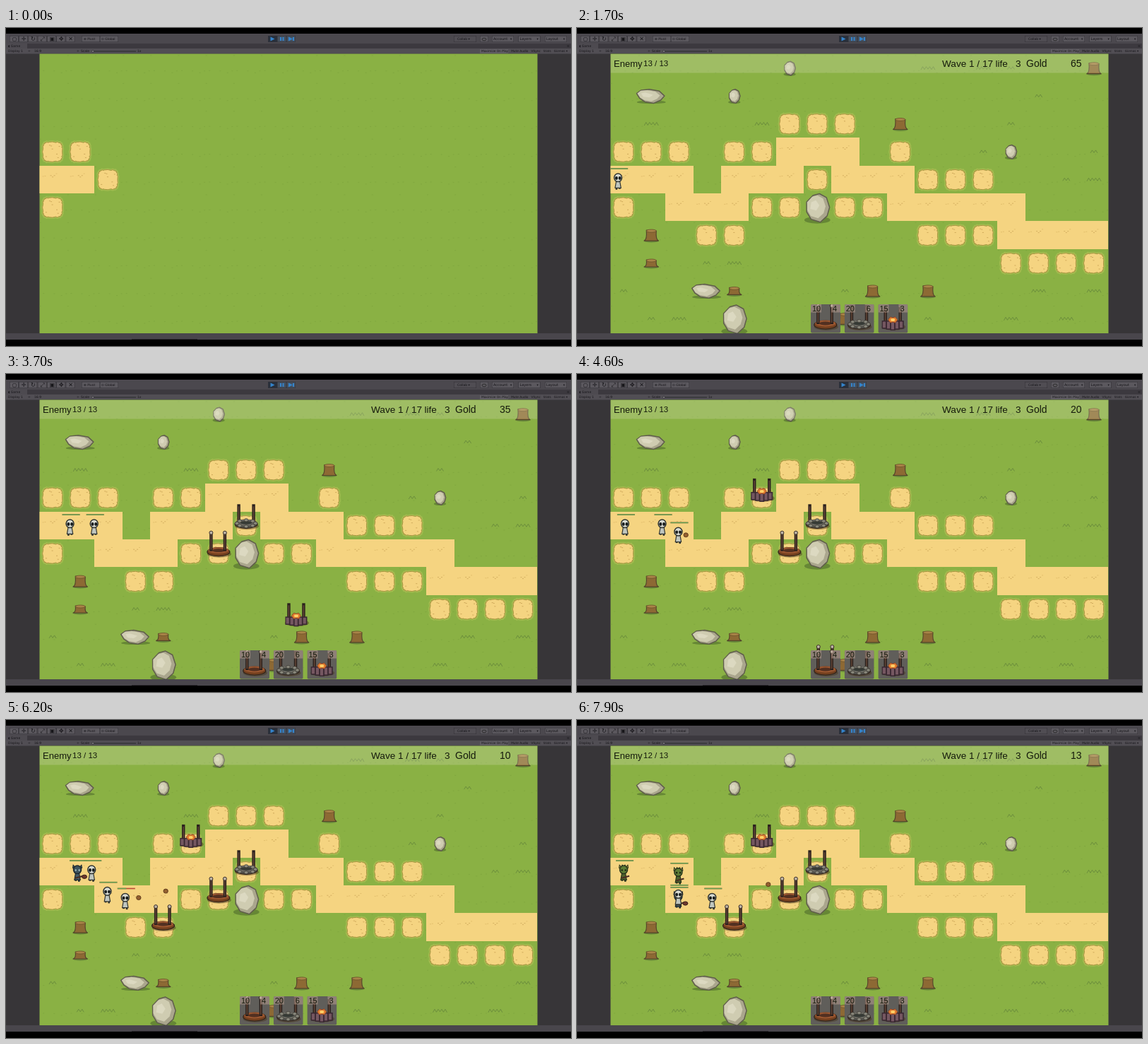
Recreate the animation shown at these times as an HTML page with a canvas. Size 800 px wide and 450 px high, loop 8 s.

```html
<!DOCTYPE html>
<html lang="en">
<head>
<meta charset="utf-8">
<title>Tower defense</title>
<style>
html, body { margin: 0; width: 100%; height: 100%; overflow: hidden; background: #000; }
canvas { display: block; width: 800px; height: 450px; }
</style>
</head>
<body>
<canvas id="stage" width="800" height="450"></canvas>
<script>
const c = document.getElementById('stage').getContext('2d');
const LOOP = 8000, STEP = 100, TAU = Math.PI * 2;
const X0 = 47, Y0 = 37, CW = 39.17, CH = 39.4;

// # road, o pad, w tuft, t stump, s low stump, r stone, f flat rock, R boulder
const level = [
  '......r....w.ww..t',
  '.f..r..........w..',
  '.w...wooo.t...w...',
  'ooo.oo###.o..wr..w',
  '###.###o###ooo..ww',
  'o.###ooRoo#####...',
  '.t.oo......ooo####',
  '.s.ww.........oooo',
  'w..fs...wt.t...w.w',
  '.ww.R...t..w..w.w.'
];
const tile = (col, row) => level[row]?.[col];
const mid = (col, row) => [X0 + (col + .5) * CW, Y0 + (row + .5) * CH];
const cells = level.flatMap((line, row) => [...line].map((kind, col) => ({ kind, col, row })));

// Follow the road from the left edge, preferring to go right
const path = [{ col: 0, row: 4 }];
for (let at = path[0], prev; at; at = prev && path.at(-1) !== prev ? path.at(-1) : null) {
  prev = at;
  const next = [[1, 0], [0, 1], [0, -1]]
    .map(([dx, dy]) => ({ col: at.col + dx, row: at.row + dy }))
    .find(p => tile(p.col, p.row) === '#' && !path.some(q => q.col === p.col && q.row === p.row));
  if (next) path.push(next);
}
const pads = cells.filter(p => p.kind === 'o');
for (const p of pads)
  p.from = path.findIndex(q => Math.abs(p.col - q.col) + Math.abs(p.row - q.row) === 1);

const shop = [
  { kind: 'wood', price: 10, power: 4 },
  { kind: 'stone', price: 20, power: 6 },
  { kind: 'fire', price: 15, power: 3 }
];
const builds = [
  { item: 0, col: 6, row: 5, grab: 1900, drop: 2400 },
  { item: 1, col: 7, row: 4, grab: 2480, drop: 3300 },
  { item: 2, col: 5, row: 3, grab: 3600, drop: 4300 },
  { item: 0, col: 4, row: 6, grab: 4600, drop: 5300 }
];
const speed = { ghost: 33.3, cat: 47, goblin: 60 };
const foes = [
  { kind: 'ghost', born: 1380 },
  { kind: 'ghost', born: 2405 },
  { kind: 'cat', born: 5060 },
  { kind: 'ghost', born: 3985 },
  { kind: 'goblin', born: 6240 },
  { kind: 'goblin', born: 7590 }
];
const FLIGHT = 800, DAMAGE = .25, BOUNTY = 3;
const shots = [3855, 4690, 5516, 5750, 7685];
// The leading foe takes shots until it falls, then the next one does
const target = i => foes[Math.floor(i * DAMAGE)];
const health = (foe, t) =>
  1 - DAMAGE * shots.filter((fired, i) => target(i) === foe && t >= fired + FLIGHT).length;

const mix = (a, b, p) => a + (b - a) * p;
function seeded(seed) {
  return () => (seed = (seed * 16807 + 11) % 2147483647) / 2147483647;
}

function paint(fill, line, lw = 1) {
  c.lineJoin = 'round';
  if (fill) { c.fillStyle = fill; c.fill(); }
  if (line) { c.strokeStyle = line; c.lineWidth = lw; c.stroke(); }
}
function box(x, y, w, h, fill) { c.fillStyle = fill; c.fillRect(x, y, w, h); }
function oval(x, y, rx, ry, fill, line, lw) {
  c.beginPath(); c.ellipse(x, y, rx, ry, 0, 0, TAU); paint(fill, line, lw);
}
function poly(pts, fill, line, lw) {
  c.beginPath(); pts.forEach(p => c.lineTo(...p)); c.closePath(); paint(fill, line, lw);
}
// Closed outline of n points: shape(angle, index) gives each point
function ring(n, shape, ...style) {
  poly(Array.from({ length: n }, (_, i) => shape(i * TAU / n, i)), ...style);
}
function at(x, y, draw) { c.save(); c.translate(x, y); draw(); c.restore(); }
function text(s, x, y, size, fill = '#151a0c', face = '"Liberation Sans", Arial, sans-serif') {
  c.font = size + 'px ' + face; c.fillStyle = fill; c.fillText(s, x, y);
}
function fillCell(col, row, fill) {
  const x = Math.round(X0 + col * CW), y = Math.round(Y0 + row * CH);
  box(x, y, Math.round(X0 + (col + 1) * CW) - x, Math.round(Y0 + (row + 1) * CH) - y, fill);
}
function specks(n, seed, spread, fill) {
  const rnd = seeded(seed);
  for (let i = 0; i < n; i++) box((rnd() - .5) * spread, (rnd() - .5) * spread, 2, 1, fill);
}

function road({ col, row }) {
  fillCell(col, row, '#f5d481');
  at(...mid(col, row), () => {
    for (let i = 0; i < 3; i++) box(-4 + i * 2.5, -6 + i % 2 * 2, 2, 1, '#d3ae60');
    specks(3, 71, 30, '#e2bf6d');
  });
}

function pad({ col, row }) {
  const [x, y] = mid(col, row);
  at(x - .7, y + .3, () => {
    const edge = (a, i) => [Math.cos(a), Math.sin(a)]
      .map(v => Math.sign(v) * Math.abs(v) ** .48 * (13.7 + .6 * Math.sin(i * 2.3)));
    ring(56, edge, null, '#a3bc50', 4);
    ring(56, edge, '#f5d481', '#a58f3d', .9);
    specks(7, 29, 20, '#cfa95b');
  });
}

function rock(w, h, flat) {
  oval(0, h * .44, w * .54, h * .12, '#668735');
  const edge = (grow, shift) => (a, i) => {
    const y = Math.sin(a), r = grow * (.49 + .035 * Math.sin(i * 4.1));
    const lean = flat ? -.16 * Math.max(0, -y) : .02;
    const slim = flat ? 1 : 1 + .16 * y;
    return [w * (Math.cos(a) * r * slim + lean + shift), h * (y * r + shift * .5)];
  };
  ring(9, edge(1, 0), '#aaa68d', '#5f5d4b', 1.5);
  ring(9, edge(.8, -.07), '#cfccb1');
  ring(5, edge(.4, -.13), '#dcd9c1');
}

function stump(h) {
  oval(0, h / 2 - 1, 11, 2.5, '#68863a');
  c.beginPath();
  c.moveTo(-7, -h / 2 + 2);
  c.quadraticCurveTo(-6, h / 3, -10, h / 2 - 1);
  c.lineTo(10, h / 2 - 1);
  c.quadraticCurveTo(6, h / 3, 7, -h / 2 + 3);
  c.closePath();
  paint('#8d6934', '#55452a', 1.2);
  oval(0, -h / 2 + 3, 7, 2, '#a98348', '#6b5129', .8);
}

function tuft(wide) {
  const n = wide ? 4 : 2;
  c.beginPath();
  for (let i = -n; i <= n; i++) c.lineTo(i * 2.5, i % 2 ? -2 : 1.5 + Math.abs(i) / 4);
  paint(null, '#64853a', .8);
}

const scenery = {
  w: p => tuft((p.col + p.row) % 2),
  t: () => stump(18),
  s: () => stump(13),
  r: () => rock(16, 20),
  f: () => rock(38, 20, true),
  R: () => rock(34, 41)
};
const decor = Object.keys(scenery).flatMap(kind => cells.filter(p => p.kind === kind));

function tower(kind, x, y) {
  const wood = kind === 'wood', fire = kind === 'fire';
  const pole = px => {
    const top = fire ? -24 : -27;
    box(px - 2.2, top, 4.4, 27, '#2b211d');
    box(px - .8, top + 3, 1.5, 22, '#634637');
    if (wood) oval(px, top + 1, 2.5, 2.5, '#beb4a5', '#3a2d26');
  };
  at(x - .7, y - 3, () => {
    oval(1, 4, 17, 5, 'rgba(70,50,25,.45)');
    if (!wood) { pole(-10.5); pole(10.5); }
    if (fire) {
      for (let dx = -12; dx <= 12; dx += 6) {
        const low = 9 - Math.abs(dx) / 5;
        box(dx - 3.5, -5, 7, low + 5, '#382731');
        box(dx - 2.3, -3.5, 4.2, low + 2, '#755761');
      }
      ring(12, (a, i) => [Math.cos(a) * 6.5, -6 + Math.sin(a) * (i % 2 ? 3 : 4.8)], '#df7a2f', '#833d22', .8);
      oval(0, -6, 3, 2, '#ffd068');
    } else {
      oval(0, 1, 16, 6, wood ? '#74401f' : '#4f4e49', '#30231a', 1.2);
      oval(0, -1, 14.5, 4.4, wood ? '#9a5630' : '#6b6a63');
      oval(0, -1, 8.5, 2.4, wood ? '#523021' : '#363a35');
    }
    if (wood) { pole(-10.5); pole(9); }
    if (kind === 'stone')
      for (let a = 0; a < TAU; a += TAU / 8)
        oval(13 * Math.cos(a), 4.5 * Math.sin(a), 2.8, 2.1, '#8a897d', '#3f3d37', .8);
  });
}

function locate(foe, t) {
  const steps = (t - foe.born) / 1000 * speed[foe.kind] / CW - .45;
  const i = Math.max(0, Math.floor(steps)), p = steps - i;
  const a = mid(path[i].col, path[i].row), b = mid(path[i + 1].col, path[i + 1].row);
  return [mix(a[0], b[0], p) - 1.5, mix(a[1], b[1], p) + 3.5];
}

const looks = {
  ghost: { skin: '#d7dad2', robe: '#c0c6bf', line: '#303430', eye: '#181d1d' },
  cat: { skin: '#3d535d', robe: '#465c65', line: '#1c272c', eye: '#a8c3c4', ears: 2 },
  goblin: { skin: '#5d7d35', robe: '#4d612c', line: '#28341c', eye: '#171d12', ears: 4 }
};

function drawFoe(foe, t) {
  const [x, y] = locate(foe, t), { skin, robe, line, eye, ears = 0 } = looks[foe.kind];
  const step = Math.floor(t / 200) % 2;
  at(x, y, () => {
    box(-3.5, 7, 2.6, 4 - step, line);
    box(1, 7, 2.6, 3 + step, line);
    poly([[-2.5, -1], [2.5, -1], [4.2, 8.5], [-4.2, 8.5]], robe, line, 1.2);
    for (let i = 0; i < ears; i++) {
      const ex = mix(-4.5, 4.5, i / (ears - 1));
      poly([[ex - 2, -8], [ex * 1.3, -13], [ex + 2, -8]], ears > 2 ? '#a99543' : skin, line);
    }
    oval(0, -6, 5.5, 5.8, skin, line, 1.5);
    const big = ears ? 1.1 : 2;
    oval(-2.3, -5.3, big, big * 1.2, eye);
    oval(2.6, -5.3, big, big * 1.2, eye);
    if (!ears) return;
    c.beginPath(); c.moveTo(-3, 6); c.lineTo(8, 3); paint(null, '#4a2d22', 2);
    if (foe.kind === 'cat') oval(10, 4, 3.5, 2.6, '#6d382d', '#39201b');
  });
  box(x - 11, y - 19.5, 25, 1.6, '#b94a36');
  box(x - 11, y - 19.5, 25 * health(foe, t), 1.6, '#63a452');
}

function drawShot(fired, i, t) {
  const p = (t - fired) / FLIGHT;
  if (p < 0 || p >= 1) return;
  const [x, y] = locate(target(i), t);
  oval(mix(300, x, p), mix(224, y - 1, p), 3.2, 3, '#94602f', '#593619', .9);
}

const shopX = i => 331 + i * 47.7;

function drag({ item, col, row, grab, drop }, t) {
  const p = 1 - (1 - (t - grab) / (drop - grab)) ** 2;
  const goal = mid(col, row);
  const x = mix(shopX(item) + 22, goal[0], p) + 17 * Math.sin(p * Math.PI);
  const y = mix(415, goal[1], p);
  const over = [Math.floor((x - X0) / CW), Math.floor((y - Y0) / CH)];
  if (tile(...over) === 'o') fillCell(...over, 'rgba(75,72,25,.45)');
  tower(shop[item].kind, x, y);
}

function hud(t) {
  box(47.5, 37, 705, 26.5, 'rgba(215,220,185,.27)');
  const killed = foes.filter(f => health(f, t) <= 0).length;
  const spent = builds.reduce((sum, b) => sum + (t >= b.drop ? shop[b.item].price : 0), 0);
  text('Enemy', 52, 55, 13);
  text(13 - killed + ' / 13', 94, 54, 11.5);
  text('Wave 1 / 17', 517, 55, 13.6);
  text('life', 592.5, 55, 13.6);
  text('3', 621, 55, 13.6);
  text('Gold', 636, 55, 14);
  text(65 - spent + killed * BOUNTY, 699, 55, 14);
  shop.forEach(({ kind, price, power }, i) => {
    const x = shopX(i);
    c.save();
    c.beginPath(); c.roundRect(x, 391, 42, 40.5, 2); c.clip();
    box(x, 391, 42, 41, '#605e5a');
    tower(kind, x + 21.5, 422);
    box(x, 391, 15, 11.5, 'rgba(183,157,145,.55)');
    box(x + 29, 391, 13, 11.5, 'rgba(183,157,145,.55)');
    c.restore();
    text(price, x + 2, 401, 11);
    text(power, x + 31, 401, 11);
  });
}

function editor() {
  const ink = '#17161a', blue = '#3584cc';
  const label = (s, x, y, size = 4.5) => text(s, x, y, size, ink, '"DejaVu Sans", sans-serif');
  const button = (x, w, fill = '#5b585e') => { box(x, 11, w, 9, '#333136'); box(x + .5, 11.5, w - 1, 8, fill); };
  box(0, 0, 800, 450, '#000');
  box(0, 8, 800, 433, '#373538');
  box(0, 8, 800, 14, '#4b484e');
  box(0, 22, 800, 7, '#3c393f');
  box(0, 29, 800, 7.5, '#514e54');
  box(0, 432, 800, 9, '#49464c');
  box(178, 440, 93, 1, '#29272b');
  for (let i = 0; i < 7; i++) {
    button(5 + i * 13.3, 12.5);
    label('○✛↻⤢▣✥✕'[i], 8.5 + i * 13.3, 18.3, 8);
  }
  button(107, 26); label('⊕ Pivot', 110, 17);
  button(133, 26); label('⊙ Global', 135, 17);
  for (let i = 0; i < 3; i++) button(371 + i * 13, 13, i ? '#45505f' : '#28303c');
  for (const x of [374.5, 400]) poly([[x, 12.5], [x + 6, 15.5], [x, 18.5]], blue);
  for (const x of [388, 391.5, 406]) box(x, 13, 2, 5, blue);
  button(634, 32, '#504d53'); label('Collab ▾', 639, 17);
  button(671, 12); oval(677, 16, 3, 1.8, null, '#222', .8);
  ['Account', 'Layers', 'Layout'].forEach((s, i) => {
    const x = 688 + i * 37.5;
    button(x, 31); label(s, x + 2, 17, 5); label('▾', x + 26, 17);
  });
  box(0, 22, 30, 7, '#4d4a50'); label('◖ Game', 3, 27);
  label('≡', 794, 27);
  label('Display 1', 3, 34.3); label('÷', 31, 34.3);
  label('16:9', 40, 34.3); label('÷', 100, 34.3);
  label('Scale', 106, 34.3);
  box(122, 32.5, 62, 1, '#29282c'); oval(123, 33, 1.6, 1.6, '#777379', '#29282c', .5);
  label('1x', 186, 34.3);
  box(671, 30, 40, 6, '#605d63');
  let x = 673;
  for (const s of ['Maximize On Play', 'Mute Audio', 'VSync', 'Stats', 'Gizmos ▾']) {
    label(s, x, 34.3, 4.3);
    x += c.measureText(s).width + 4;
  }
}

function draw(t) {
  editor();
  c.save();
  c.beginPath(); c.rect(47.5, 36.5, 705, 395.5); c.clip();
  box(47, 36, 706, 396, '#8ab144');
  for (const { col, row } of cells) at(...mid(col, row), () => specks(5, 137, 38, '#80a73f'));

  const laid = Math.min(path.length, 2 + t / STEP * 4);
  pads.filter(p => p.from < laid).forEach(pad);
  path.slice(0, laid).forEach(road);
  if (laid < path.length) pad(path[laid]);

  const shown = Math.max(0, Math.min(1, (t - 700) / 400));
  for (const p of decor.slice(0, Math.round(decor.length * shown))) {
    const [x, y] = mid(p.col, p.row);
    at(x - .5, y, () => scenery[p.kind](p));
  }
  for (const b of builds) if (t >= b.drop) tower(shop[b.item].kind, ...mid(b.col, b.row));
  for (const f of foes) if (t >= f.born && health(f, t) > 0) drawFoe(f, t);
  shots.forEach((fired, i) => drawShot(fired, i, t));
  const held = builds.find(b => t >= b.grab && t < b.drop);
  if (held) drag(held, t);
  if (t >= 1100) hud(t);
  c.restore();
}

let last = -1;
function frame() {
  const t = Math.floor(performance.now() % LOOP / STEP) * STEP;
  if (t !== last) draw(last = t);
  requestAnimationFrame(frame);
}
frame();
</script>
</body>
</html>
```
